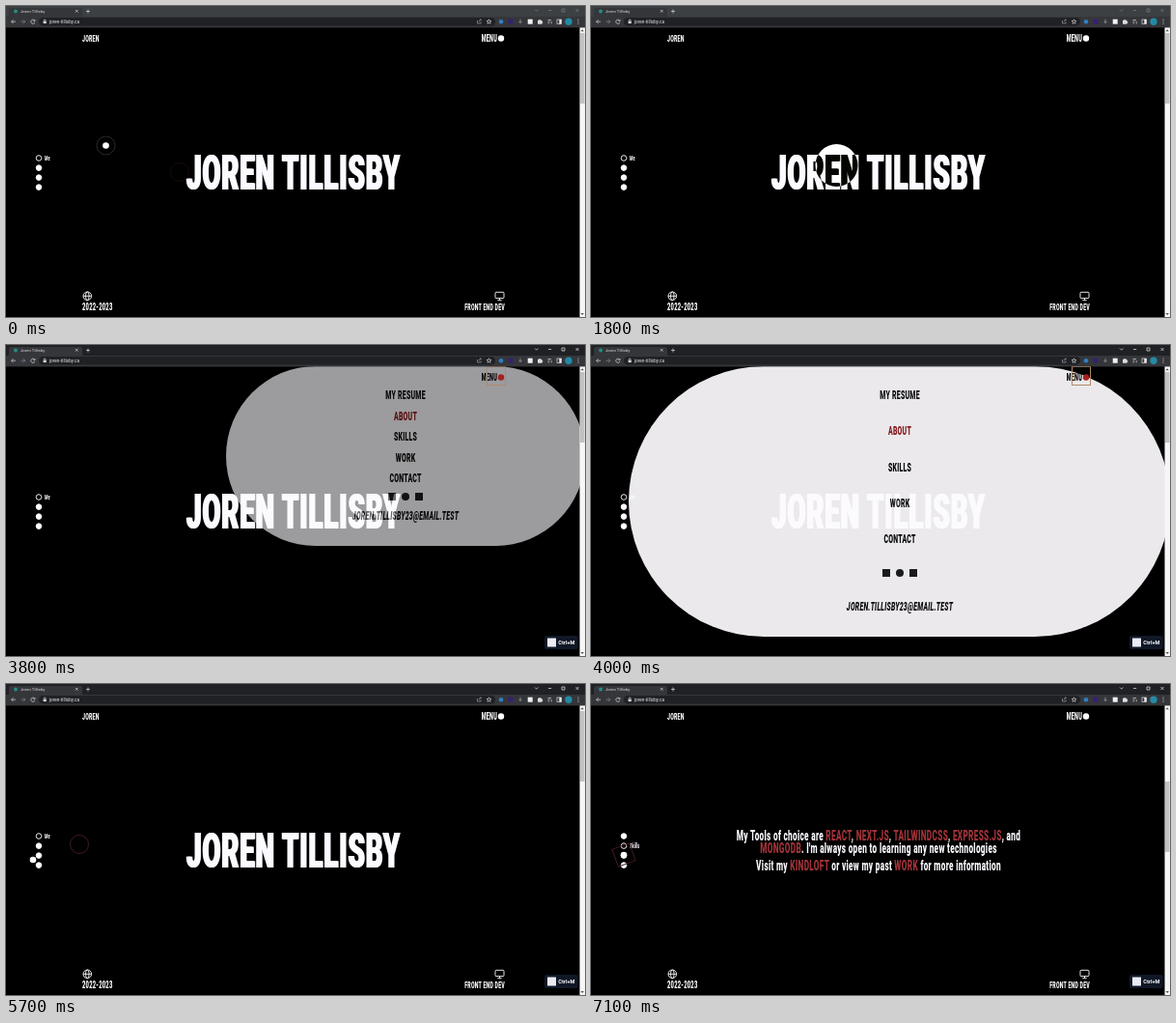
Write an HTML page that moves like this. It is 600x322 px and loops after 7.2 s.

```html
<!DOCTYPE html>
<html lang="en">
<head>
<meta charset="utf-8">
<title>Portfolio</title>
<style>
html, body { margin: 0; width: 100%; height: 100%; overflow: hidden; background: #000; }
#stage { position: relative; width: 600px; height: 322px; overflow: hidden; isolation: isolate; background: #000; }
#stage > svg { position: absolute; inset: 0; }
svg text { font-family: Roboto, "Open Sans", sans-serif; }

/* condensed display face */
.d {
  position: absolute; left: calc(var(--x) * 1px); top: calc(var(--y) * 1px);
  font: 900 calc(var(--s, 10) * 1px)/1 Roboto, Inter, sans-serif;
  letter-spacing: .035em; white-space: nowrap; color: #fbfaff;
  transform-origin: 0 50%; transform: translateY(-50%) scaleX(.55);
}
.c { transform-origin: 50% 50%; transform: translate(-50%, -50%) scaleX(.55); }
.r { transform-origin: 100% 50%; transform: translate(-100%, -50%) scaleX(.55); }
.d i { font-style: normal; color: #a23339; }
.title { text-shadow: .03em 0 currentColor, -.03em 0 currentColor; }

#view { position: absolute; inset: 22px 0 0; overflow: hidden; }
#menu { position: absolute; right: 0; top: 22px; overflow: hidden; background: #fcfafd; }
#menu .d { left: 50%; --s: 12.6; color: #0c0c0e; }
#menu .on { color: #8e1c20; }
#menu .mail { font-style: italic; }
#links { position: absolute; left: 50%; width: 36px; height: 8px; margin: -4px 0 0 -18px; display: flex; justify-content: space-between; }
#links span { width: 8px; height: 8px; background: #1d1d20; }
#links .round { border-radius: 50%; }

#dot, #ring, #halo { position: absolute; left: 0; top: 0; border-radius: 50%; box-sizing: border-box; }
#dot { width: 44px; height: 44px; background: #fff; mix-blend-mode: difference; }
#ring, #halo { width: 20px; height: 20px; border: 1px solid; }
#halo { border-color: #2e2a2c; }
.frame .d { color: var(--ink); }
.frame .line { fill: none; stroke: var(--ink); stroke-width: .9; }
</style>
</head>
<body>
<div id="stage">
  <div id="view">
    <div id="pages">
      <b class="d c title" style="--x:297.5;--y:150.5;--s:50">JOREN TILLISBY</b>
      <b class="d c" style="--x:297.5;--y:435;--s:15">My Tools of choice are <i>REACT</i>, <i>NEXT.JS</i>, <i>TAILWINDCSS</i>, <i>EXPRESS.JS</i>, and</b>
      <b class="d c" style="--x:297.5;--y:448;--s:15"><i>MONGODB</i>. I'm always open to learning any new technologies</b>
      <b class="d c" style="--x:297.5;--y:466;--s:15">Visit my <i>KINDLOFT</i> or view my past <i>WORK</i> for more information</b>
    </div>
  </div>

  <div id="menu">
    <b class="d c row">MY RESUME</b>
    <b class="d c row on">ABOUT</b>
    <b class="d c row">SKILLS</b>
    <b class="d c row">WORK</b>
    <b class="d c row">CONTACT</b>
    <div id="links" class="row"><span></span><span class="round"></span><span></span></div>
    <b class="d c row mail">JOREN.TILLISBY23@EMAIL.TEST</b>
  </div>

  <div id="halo"></div>
  <div id="dot"></div>

  <div class="frame" id="frame">
    <b class="d" style="--x:79;--y:33.5;--s:9.6">JOREN</b>
    <b class="d r" style="--x:509;--y:33.5">MENU</b>
    <b class="d" style="--x:79;--y:311.5;--s:10.6">2022-2023</b>
    <b class="d r" style="--x:516.5;--y:311.5;--s:9.6">FRONT END DEV</b>
    <svg width="600" height="322" style="position:absolute;left:0;top:0">
      <circle id="knob" cx="513" cy="33.5" r="3.2"/>
      <g class="line">
        <circle cx="84.3" cy="300.3" r="4.3"/>
        <ellipse cx="84.3" cy="300.3" rx="1.8" ry="4.3"/>
        <path d="M80 300.3h8.6"/>
        <rect x="507" y="296.3" width="9" height="6.3" rx="1"/>
        <path d="M511.5 302.6v2M509.3 304.7h4.4"/>
      </g>
    </svg>
  </div>

  <svg id="nav" width="600" height="322" stroke="#fff" stroke-width=".9">
    <circle cx="34" cy="157.5" r="2.8"/>
    <circle cx="34" cy="167.6" r="2.8"/>
    <circle cx="34" cy="177.6" r="2.8"/>
    <circle cx="34" cy="187.6" r="2.8"/>
  </svg>
  <b class="d" id="label" style="--x:39.5;--s:7"></b>
  <div id="ring"></div>

  <svg width="600" height="322">
    <rect x="594.5" y="22" width="5.500" height="300" fill="#f6f6f6"/>
    <rect id="thumb" x="595" y="28" width="4.500" height="73" fill="#c1c1c1"/>
    <path d="M595.5 26.3l1.700-2 1.700 2zM595.5 318l1.700 2 1.700-2z" fill="#505050"/>

    <rect id="strip" width="600" height="12"/>
    <path d="M1 11.5q2 0 2-2V4q0-2 2-2h72q2 0 2 2v5.500q0 2 2 2z" fill="#35363a"/>
    <rect y="11" width="600" height="11.400" fill="#35363a"/>
    <rect x="34" y="12" width="473" height="8.600" rx="4.300" fill="#202124"/>
    <circle cx="10" cy="5.500" r="1.900" fill="#1f8f86"/>
    <text x="15" y="7" font-size="4.300" fill="#dfe1e5">Joren Tillisby</text>
    <text x="45" y="18" font-size="4.700" fill="#e8eaed">joren-tillisby.ca</text>
    <g fill="none" stroke="#d5d7da" stroke-width=".7">
      <path d="M72 4l2.600 2.600m0-2.600l-2.600 2.600M83 5.500h4m-2-2v4"/>
      <path d="M10 16.200h-4.400m2-2l-2 2 2 2"/>
      <path d="M15.500 16.200h4.400m-2-2l2 2-2 2" stroke="#85888c"/>
      <path d="M29.600 15a2.100 2.100 0 1 0 .3 2m.1-3v1.700h-1.700"/>
      <path d="M39.200 15.800v-.8a1 1 0 0 1 2 0v.8"/>
      <path d="M488.500 15v3h3.600v-1.500m-2-.3q.3-1.800 2.200-1.800m-1-1l1 1-1 1" stroke="#9aa0a6"/>
      <path d="M500.500 13.800l.7 1.600 1.700.1-1.300 1.100.4 1.700-1.500-.9-1.500.9.400-1.700-1.300-1.100 1.700-.1z"/>
      <path d="M533 13.800v3.600m-1.500-1.400l1.500 1.500 1.500-1.500" stroke="#aeb1b5"/>
      <path d="M561.500 14.500h3.500m-3.500 1.700h2m-2 1.700h1.500m2.200-2v2.500"/>
      <rect x="571" y="14" width="4.500" height="4.500"/>
    </g>
    <rect x="38.600" y="15.700" width="3.200" height="2.400" fill="#d5d7da"/>
    <circle cx="513" cy="16.200" r="2.300" fill="#2f7fc4"/>
    <rect x="520.500" y="13.600" width="5" height="5" fill="#36206f"/>
    <rect x="540.700" y="13.700" width="5" height="5" fill="#f1f1f1"/>
    <path d="M551 14.800h1.300a.9.9 0 0 1 1.800 0h1.300v1.200a.9.9 0 0 1 0 1.800v1h-4.400z" fill="#dadce0"/>
    <rect x="573.300" y="14" width="2.200" height="4.500" fill="#e8eaed"/>
    <circle cx="583" cy="16.200" r="3.700" fill="#2589a6"/>
    <path d="M593 14v.1m0 2v.1m0 2v.1" stroke="#d5d7da" stroke-width="1" stroke-linecap="round"/>
    <path id="controls" d="M548 3.500l1.700 1.700 1.700-1.700M562 4.500h3.200M576 3h3v3h-3zM590.500 3l3 3m0-3l-3 3" fill="none" stroke-width=".7"/>

    <g id="badge">
      <rect x="558" y="301" width="34.500" height="14" rx="2" fill="#101827"/>
      <rect x="561" y="303.500" width="9" height="9" fill="#eceaf4"/>
      <text x="572.300" y="310.200" font-size="5.600" font-weight="700" fill="#fff">Ctrl+M</text>
    </g>
  </svg>
</div>

<script>
const LOOP = 7200, STEP = 100, LAG = 100;
const OPEN = 3344, CLOSE = 4715, MENU_TIME = 800;
const $ = id => document.getElementById(id);
const clamp = v => Math.min(1, Math.max(0, v));
const ramp = (t, from, to) => clamp((t - from) / (to - from));
const within = (t, from, to) => t >= from && t < to;

// the CSS ease-in-out curve, cubic-bezier(.42, 0, .58, 1)
function easeInOut(x) {
  let lo = 0, hi = 1, s = .5;
  for (let i = 0; i < 20; i++) {
    const bx = 3 * s * (1 - s) * (.42 * (1 - s) + .58 * s) + s ** 3;
    if (bx < x) lo = s; else hi = s;
    s = (lo + hi) / 2;
  }
  return s * s * (3 - 2 * s);
}

// pointer path: time, x, y
const path = [
  [-100, 180, 172], [0, 103.5, 144.5], [200, 66, 172], [400, 82, 232], [600, 134, 280],
  [800, 190, 298], [1000, 226, 268], [1200, 236, 226], [1400, 232, 192], [1600, 238, 174],
  [1800, 254.5, 165], [2000, 296, 166], [2200, 306, 178], [2400, 289, 186], [2500, 304, 189],
  [2600, 330, 188], [2800, 389, 169], [2900, 421.5, 146.5], [3000, 468, 93], [3200, 489, 45],
  [3300, 508, 32], [4800, 508, 32], [5000, 476, 42], [5200, 384, 72], [5400, 226, 122],
  [5500, 142, 148], [5600, 76, 166], [5700, 28, 182], [5900, 27, 174], [6100, 34, 168],
  [6600, 34, 168], [7000, 34, 177]
];

function pointer(t) {
  let i = path.findIndex(p => p[0] > t);
  if (i < 0) return path[path.length - 1].slice(1);
  i = Math.max(1, i);
  const [t0, x0, y0] = path[i - 1], [t1, x1, y1] = path[i];
  const k = ramp(t, t0, t1);
  return [x0 + (x1 - x0) * k, y0 + (y1 - y0) * k];
}

const menuSize = t =>
  easeInOut(ramp(t, OPEN, OPEN + MENU_TIME)) - easeInOut(ramp(t, CLOSE, CLOSE + MENU_TIME));

const rows = [...document.querySelectorAll(".row")];
const navDots = [...$("nav").children];

function drawMenu(p) {
  const h = 300 * p, gap = Math.max(16, (h - 56.6) / 6);
  Object.assign($("menu").style, {
    width: 600 * p + "px", height: h + "px", opacity: p,
    borderRadius: Math.min(h / 2, 3600 * (1 - p)) + "px"
  });
  rows.forEach((row, i) => {
    row.style.top = 30 + i * gap - 2.2 * Math.max(0, i - 4) + "px";
  });
}

function drawPointer(t) {
  const [x, y] = pointer(t), [rx, ry] = pointer(t - LAG);
  const grow = ramp(t, 1400, 1700) - ramp(t, 2500, 2700);
  const overMenu = within(t, 3300, 4900);
  const square = ramp(t, 3200, 3400) - ramp(t, 4800, 5000) + ramp(t, 6000, 6300);
  const scale = .15 + .85 * grow;
  $("dot").style.transform = `translate(${x - 22}px, ${y - 22}px) scale(${scale})`;
  $("dot").style.opacity = overMenu ? 0 : 1;
  $("halo").style.transform = `translate(${x - 10}px, ${y - 10}px)`;
  $("halo").style.opacity = t < 100 ? 1 : 0;
  Object.assign($("ring").style, {
    transform: `translate(${rx - 10}px, ${ry - 10}px) rotate(${-20 * ramp(t, 6000, 7000)}deg)`,
    borderRadius: 50 * (1 - square) + "%",
    borderColor: overMenu ? "#b08a6a" : "#42191d",
    opacity: grow > 0 ? 0 : t < 100 ? .4 : 1
  });
  $("knob").setAttribute("fill", overMenu ? "#a3211f" : "#fff");
}

function drawNav(active) {
  navDots.forEach((dot, i) => dot.setAttribute("fill", i === active ? "none" : "#fff"));
  $("label").textContent = ["Me", "Skills"][active];
  $("label").style.setProperty("--y", 157.6 + 10.1 * active);
}

function draw(t) {
  const focused = t >= OPEN - STEP;
  const scroll = easeInOut(ramp(t, 6300, 6900));
  $("pages").style.transform = `translateY(${-300 * scroll}px)`;
  $("thumb").setAttribute("y", 28 + 73 * scroll);
  $("frame").style.setProperty("--ink", within(t, OPEN, CLOSE) ? "#000" : "#fff");
  $("strip").setAttribute("fill", focused ? "#202124" : "#3c4043");
  $("controls").setAttribute("stroke", focused ? "#e8eaed" : "#7d8084");
  $("badge").style.opacity = focused ? 1 : 0;
  drawMenu(menuSize(t));
  drawPointer(t);
  drawNav(scroll > .5 ? 1 : 0);
}

function tick() {
  draw(Math.floor(performance.now() % LOOP / STEP) * STEP);
  requestAnimationFrame(tick);
}
tick();
</script>
</body>
</html>
```
